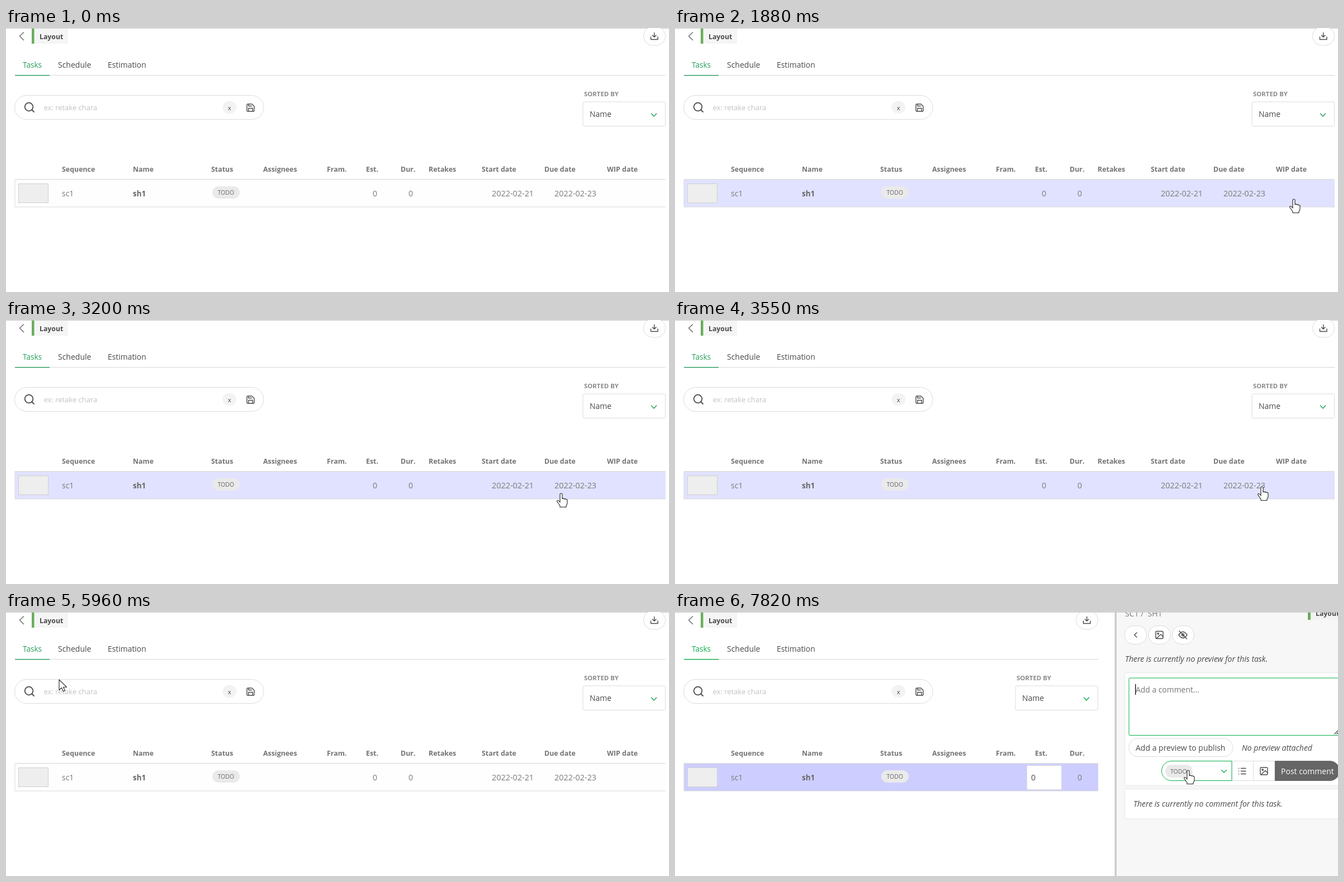
An HTML page that plays this animation: 1186 by 472 pixels, repeating every 8 s.

```html
<!DOCTYPE html>
<html lang="en">
<head>
<meta charset="utf-8">
<title>Task list</title>
<style>
html, body { margin: 0; width: 100%; height: 100%; overflow: hidden; background: #fff; }
svg { display: block; --green: #279d5c; }
svg.open { --green: #0aae49; }
text { font: 14px "Open Sans", "Noto Sans", sans-serif; fill: #4a4a4a; white-space: pre; }
.head text { font-size: 12.4px; font-weight: 700; fill: #747474; }
.row text { fill: #7a7a7a; }
text.strong { font-weight: 700; font-size: 13.4px; fill: #666; }
text.chip { font-size: 10.5px; fill: #666; }
text.note { font-style: italic; }
.box { fill: #fff; stroke: #dcdcdc; }
.icon { fill: none; stroke: #4a4a4a; stroke-width: 1.4; stroke-linecap: round; stroke-linejoin: round; }
.green { stroke: var(--green); }
.rule { fill: #dcdcdc; }
#panel, #est, .open #wide { display: none; }
.open #panel, .open #est { display: inline; }
.open #side { transform: translateX(-423px); }
#row { fill: #fefefe; }
.hover #row { fill: #e0e2ff; }
.open #row { fill: #cdceff; }
.pick #status { stroke: var(--green); }
#cursor path { fill: #fff; stroke: #222; stroke-width: 1.1; stroke-linejoin: round; }
</style>
</head>
<body>
<svg id="stage" width="1186" height="472" viewBox="0 0 1186 472">
  <defs>
    <g id="picture" class="icon">
      <rect x="-6.5" y="-6.5" width="13" height="13" rx="1.5"/>
      <circle cx="-2.3" cy="-2.3" r="1.2"/>
      <path d="M-5 6L2.5-1L6.5 3"/>
    </g>
    <filter id="soft" x="-5%" y="-10%" width="110%" height="120%">
      <feDropShadow dx="0" dy="0" stdDeviation="1.8" flood-color="#000" flood-opacity=".13"/>
    </filter>
  </defs>

  <rect width="1186" height="1" fill="#ccc"/>
  <path class="icon" style="stroke:#777;stroke-width:1.7" d="M31.5 8L24.5 14.5L31.5 21.5"/>
  <rect x="46" y="1" width="65" height="27" fill="#f5f5f5"/>
  <rect x="46" y="1" width="4.5" height="27" fill="#69ae5a"/>
  <text x="60" y="20" style="font-weight:700;font-size:12.3px">Layout</text>

  <rect class="rule" data-end x="16" y="84" height="1.2"/>
  <rect x="16" y="84" width="62" height="1.4" fill="var(--green)"/>
  <g style="font-size:13.9px">
    <text x="30" y="71" style="font-size:13.6px;fill:var(--green)">Tasks</text>
    <text x="93" y="71">Schedule</text>
    <text x="182" y="71" style="font-size:13.9px">Estimation</text>
  </g>

  <rect class="box" x="15.5" y="120.5" width="445.5" height="43" rx="21.5"/>
  <g class="icon" style="stroke-width:1.8"><circle cx="41" cy="141" r="7.3"/><path d="M46.5 146.5L50 150"/></g>
  <text x="67.5" y="147" style="font-size:13px;fill:#c2c2c2">ex: retake chara</text>
  <rect x="387.5" y="131" width="24.5" height="22" rx="11" fill="#f3f3f3"/>
  <text x="396.7" y="146.5" style="font-size:11.5px">x</text>
  <path class="icon" d="M431 137.5q0-1.5 1.5-1.5H440L444 140V147.5q0 1.5-1.5 1.5H432.500q-1.500 0-1.500-1.500ZM433.800 149V143.500H441.200V149M433.800 136V139.500H439.500"/>

  <g id="side">
    <rect class="box" x="1140.500" y="-2" width="39" height="33" rx="16.500"/>
    <path class="icon" d="M1153.500 16V20.500H1166V16M1159.700 8.500V16M1156.500 13L1159.700 16.300L1163 13"/>
    <text x="1034" y="121.500" style="font-size:11.400px;font-weight:700;fill:#8a8a8a">SORTED BY</text>
    <rect class="box" x="1032" y="132" width="147.500" height="43.500" rx="2"/>
    <text x="1044" y="159">Name</text>
    <path class="icon green" d="M1154.500 153L1159 158L1163.500 153"/>
  </g>

  <g class="head">
    <text x="100" y="257">Sequence</text>
    <text x="227" y="257">Name</text>
    <text x="367" y="257">Status</text>
    <text x="460" y="257">Assignees</text>
    <text x="574" y="257">Fram.</text>
    <text x="644" y="257">Est.</text>
    <text x="706" y="257">Dur.</text>
  </g>
  <rect id="row" data-end x="16" y="271" height="49"/>
  <rect class="rule" data-end x="16" y="270" height="1.300"/>
  <rect class="rule" data-end x="16" y="319.500" height="1"/>
  <rect class="rule" x="15.500" y="271" width="1" height="49"/>
  <rect x="22.500" y="278.500" width="53" height="34" fill="#eee" stroke="#d0d0d0"/>
  <g class="row">
    <text x="100" y="300.500">sc1</text>
    <text x="227" y="300.500" class="strong">sh1</text>
    <rect x="369" y="283" width="49" height="22" rx="11" fill="#eaeaea"/>
    <text x="378.500" y="298" class="chip">TODO</text>
    <text x="656" y="300.500">0</text>
    <text x="720" y="300.500">0</text>
  </g>
  <g id="wide">
    <g class="head">
      <text x="756" y="257">Retakes</text>
      <text x="851" y="257">Start date</text>
      <text x="963" y="257">Due date</text>
      <text x="1075" y="257">WIP date</text>
    </g>
    <g class="row">
      <text x="869" y="300.500" style="font-size:14.400px">2022-02-21</text>
      <text x="981" y="300.500" style="font-size:14.400px">2022-02-23</text>
    </g>
  </g>
  <g id="est">
    <rect class="box" x="629.500" y="274.500" width="62" height="43" rx="2"/>
    <text x="637" y="301">0</text>
  </g>

  <g id="panel">
    <rect x="786.500" y="1" width="3.500" height="471" fill="#ccc"/>
    <rect x="790" y="1" width="396" height="471" fill="#f7f7f7"/>
    <text x="805" y="8" style="fill:#777">SC1 /  SH1</text>
    <rect x="1132" y="0" width="54" height="14" fill="#f3f3f3"/>
    <rect x="1132" y="0" width="5" height="14" fill="#69ae5a"/>
    <text x="1146" y="6.500" style="font-weight:700;font-size:12.300px">Layout</text>
    <rect width="1186" height="1" fill="#ccc"/>

    <g class="box">
      <rect x="804.500" y="24.500" width="39" height="33" rx="16.500"/>
      <rect x="847" y="24.500" width="39" height="33" rx="16.500"/>
      <rect x="889.500" y="24.500" width="39" height="33" rx="16.500"/>
    </g>
    <path class="icon" d="M826 37L821.800 41L826 45"/>
    <use href="#picture" x="866.500" y="41"/>
    <g class="icon">
      <path d="M901 41Q908.500 30 916 41Q908.500 52 901 41ZM902 34L915.500 48"/>
      <circle cx="908.600" cy="41" r="2"/>
    </g>
    <text x="805" y="89" class="note">There is currently no preview for this task.</text>

    <rect x="805" y="109.500" width="400" height="200" rx="4" fill="#fff" filter="url(#soft)"/>
    <rect class="green" x="812" y="118" width="390" height="102.500" rx="2" fill="#fff"/>
    <text x="824" y="144" style="font-size:13.900px;fill:#757575">Add a comment...</text>
    <rect id="caret" x="823" y="129" width="1.500" height="19" fill="#222"/>
    <path class="icon" d="M1180 218L1187 211M1184 218L1187 215"/>
    <rect class="box" x="811.500" y="226" width="186.500" height="32.500" rx="16.200"/>
    <text x="824" y="247.500">Add a preview to publish</text>
    <text x="1014" y="247.500" class="note">No preview attached</text>

    <rect class="box" x="996" y="266.500" width="38.500" height="35"/>
    <rect class="box" x="1034.500" y="266.500" width="38.500" height="35"/>
    <path id="status" class="box" d="M996 266.500H888a17.500 17.500 0 0 0 0 35H996Z"/>
    <rect x="877" y="273" width="49" height="23" rx="11.500" fill="#eaeaea"/>
    <text x="886" y="288.700" class="chip">TODO</text>
    <path class="icon green" d="M977.500 282.500L982 287L986.500 282.500"/>
    <path class="icon" d="M1012.500 279.500H1021M1012.500 284.500H1021M1012.500 289.500H1021M1008.500 279.500h.2M1008.500 284.500h.2M1008.500 289.500h.2"/>
    <use href="#picture" x="1053.500" y="284.500"/>
    <path d="M1073 266H1171a18 18 0 0 1 0 36H1073Z" fill="#666"/>
    <text x="1084" y="289.500" style="fill:#fff">Post comment</text>

    <rect x="805" y="317.500" width="400" height="51" rx="4" fill="#fff" filter="url(#soft)"/>
    <text x="820" y="348" class="note">There is currently no comment for this task.</text>
  </g>

  <g id="cursor">
    <path id="arrow" d="M0 0V18.500L4.500 14.500L7.500 21L10.500 19.800L7.600 13.200H13.500Z"/>
    <path id="hand" d="M-2 16V2a2 2 0 0 1 4 0V9.500q2-1.600 3.400.6q2-1.200 3.200.7q2.200-.9 2.400 1.700v5q0 2.500-2 4.500V24.500H-2v-2.500l-5-7q-1-2.200 1-2.500q1.500 0 4 3.500z"/>
  </g>
</svg>
<script>
const LOOP = 8000, TICK = 69, APPEAR = 530, OPEN = 6700;
// starts of the bursts of movement; the pointer is sampled on ticks within each
const bursts = [530, 990, 1810, 2640, 3480, 4300, 5130, 5680, 6560, 7400];
// pointer path: time, x, y
const path = [
  [530, 1048, 441], [668, 893, 387], [990, 893, 387], [1128, 869, 386],
  [1400, 967, 352], [1600, 1080, 342], [1740, 1110, 352], [1810, 1118, 338],
  [1879, 1107, 306], [2080, 980, 216], [2293, 848, 290], [2569, 848, 275],
  [3400, 1041, 322], [3480, 1044, 325], [3549, 1050, 298], [4230, 600, 300],
  [4300, 590, 298], [4852, 280, 199], [5060, 52, 79], [5130, 52, 76],
  [5475, 60, 16], [5680, 60, 16], [6430, 155, 301], [6560, 155, 301],
  [6629, 157, 303], [6780, 160, 304], [7330, 712, 333], [7400, 722, 331],
  [7814, 918, 283]
];
const $ = id => document.getElementById(id);
const stage = $("stage"), cursor = $("cursor"), ends = document.querySelectorAll("[data-end]");
const show = (el, on) => { el.style.visibility = on ? "visible" : "hidden"; };
const within = (v, a, b) => v >= a && v < b;

function snap(t) {
  const start = bursts.filter(b => b <= t).pop() ?? 0;
  return start + Math.floor((t - start + 4) / TICK) * TICK;
}

function pointer(t) {
  const i = path.findIndex(k => k[0] > t);
  if (i < 0) return path[path.length - 1].slice(1);
  if (i === 0) return path[0].slice(1);
  const [t0, x0, y0] = path[i - 1], [t1, x1, y1] = path[i];
  const p = (t - t0) / (t1 - t0);
  return [x0 + (x1 - x0) * p, y0 + (y1 - y0) * p];
}

function draw(t) {
  const visible = t >= APPEAR, open = t >= OPEN, end = open ? 757 : 1180;
  const [x, y] = pointer(snap(t)).map(Math.round);
  const onRow = visible && within(x, 16, end) && within(y, 271, 324);
  const onTab = within(x, 16, 78) && within(y, 48, 85);
  const onStatus = open && within(x, 870, 997) && within(y, 266, 302);
  const hand = onRow || onTab || onStatus;

  stage.classList.toggle("open", open);
  stage.classList.toggle("hover", onRow);
  stage.classList.toggle("pick", onStatus);
  ends.forEach(el => el.setAttribute("width", end - 16));
  cursor.setAttribute("transform", `translate(${x} ${y})`);
  show($("arrow"), visible && !hand);
  show($("hand"), visible && hand);
  show($("caret"), open && Math.floor((t - OPEN) / 530) % 2 === 0);
}

function frame() {
  draw(performance.now() % LOOP);
  requestAnimationFrame(frame);
}
frame();
</script>
</body>
</html>
```
